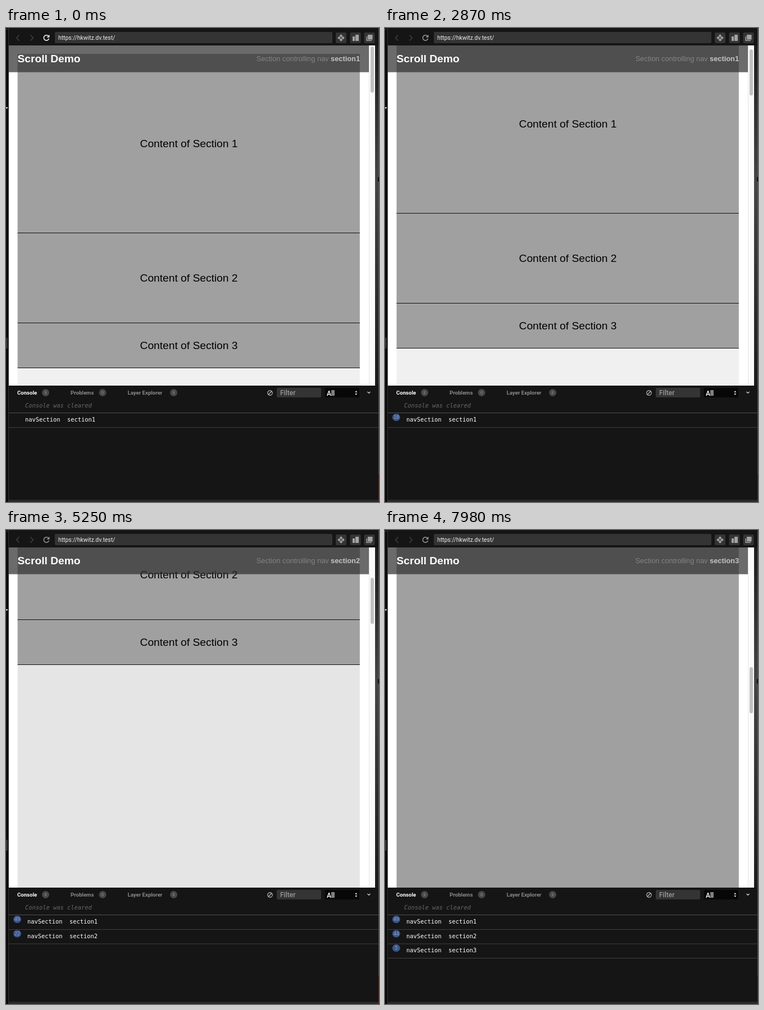
An HTML page that plays this animation: 664x843 px, repeating every 8 s.

```html
<!DOCTYPE html>
<html lang="en">
<head>
<meta charset="utf-8">
<title>Scroll Demo</title>
<style>
  html, body { margin: 0; width: 100%; height: 100%; overflow: hidden; background: #151515; }
  svg { display: block; width: 664px; height: 843px; }
  text { white-space: pre; }
  .ui { font-family: Roboto, "Open Sans", sans-serif; font-size: 10.4px; }
  .field { font-size: 12px; font-weight: 500; }
  .tab { font-size: 9.6px; font-weight: 700; }
  .page { font-family: "Liberation Sans", Arial, sans-serif; font-size: 19.2px; }
  .mono { font-family: "DejaVu Sans Mono", monospace; font-size: 10.4px; }
  .num { font-family: "DejaVu Sans Mono", monospace; font-size: 8.5px; text-anchor: middle; }
  .line { fill: none; stroke-width: 1.2; }
</style>
</head>
<body>
<svg viewBox="0 0 664 843" xmlns="http://www.w3.org/2000/svg">
  <defs>
    <clipPath id="view"><rect x="5" y="31" width="641" height="605"/></clipPath>
    <linearGradient id="edge" x1="0" y1="0" x2="0" y2="1">
      <stop offset="0" stop-color="#1c1c1c"/>
      <stop offset=".4" stop-color="#454545"/>
      <stop offset="1" stop-color="#1a1a1a"/>
    </linearGradient>
  </defs>

  <!-- window frame -->
  <rect width="664" height="843" fill="#151515"/>
  <rect width="4" height="843" fill="#0b0b0b"/>
  <rect x="4" width="1" height="843" fill="#333"/>
  <rect y="2" width="4" height="1" fill="#333"/>
  <rect y="141" width="3" height="2" fill="#ddd"/>
  <rect y="551" width="3" height="19" fill="#333"/>
  <rect x="657" y="31" width="6" height="605" fill="url(#edge)"/>
  <rect x="663" width="1" height="793" fill="#505050"/>
  <rect x="662" y="265" width="2" height="8" fill="#111"/>
  <rect x="663" y="793" width="1" height="50" fill="#54271f"/>
  <rect x="5" y="839" width="658" height="4" fill="#2a2a2a"/>

  <!-- toolbar -->
  <g class="line" stroke="#484848">
    <path d="M23.5 12.5 18.5 17.5 23.5 22.5"/>
    <path d="M43.5 12.5 48.5 17.5 43.5 22.5"/>
  </g>
  <g id="reload">
    <path class="line" stroke="currentColor" style="stroke-width:1.5" d="M75.6 14.4A4.7 4.7 0 1 0 76.5 18.8"/>
    <path fill="currentColor" d="M77.4 11.8V16.7H72.5Z"/>
  </g>
  <rect x="87" y="7" width="494" height="20" rx="2" fill="#343434"/>
  <text class="ui" x="93" y="21" fill="#f0f0f0">https://hkwitz.dv.test/</text>
  <g fill="#343434">
    <rect x="587" y="8" width="19" height="19" rx="2"/>
    <rect x="612.5" y="8" width="19" height="19" rx="2"/>
    <rect x="637.5" y="8" width="19" height="19" rx="2"/>
  </g>
  <g fill="#a2a2a2">
    <path d="M596.5 11.2l2.8 2.8-2.8 2.8-2.8-2.8zm0 7l2.8 2.8-2.8 2.8-2.8-2.8zm-3.5-3.5l2.8 2.8-2.8 2.8-2.8-2.8zm7 0l2.8 2.8-2.8 2.8-2.8-2.8z"/>
    <path d="M617 15h4v8h-4zM622 12h6v11h-6z"/>
    <path d="M641.5 15h1.5v6.5h8v1.5h-9.5zM644 12h8.5v8.5H644z"/>
  </g>

  <!-- browser page -->
  <rect x="5" y="31" width="652" height="605" fill="#fff"/>
  <g id="page">
    <g clip-path="url(#view)">
      <g id="content" class="page" text-anchor="middle">
        <rect id="tail" x="20.6" y="605" width="609.2" height="2400"/>
        <rect id="sections" x="20.6" y="46" width="609.2" height="559"/>
        <path d="M20.6 364.5H629.8M20.6 524.5H629.8M20.6 604.5H629.8" stroke="#000" stroke-opacity=".9"/>
        <text x="325.5" y="212">Content of Section 1</text>
        <text x="325.5" y="451">Content of Section 2</text>
        <text x="325.5" y="571">Content of Section 3</text>
      </g>
      <rect x="5" y="31" width="641" height="47.6" fill="#2d2d2d" fill-opacity=".7"/>
      <text class="page" x="20.5" y="61" font-weight="700" fill="#fff">Scroll Demo</text>
      <text class="page" x="630" y="59" text-anchor="end" style="font-size:12.8px" fill="#848484">Section controlling nav <tspan id="nav" font-weight="700" fill="#c4c4c4">section1</tspan></text>
    </g>
    <rect x="646" y="31" width="11" height="605" fill="#fafafa"/>
    <rect x="646" y="31" width="1" height="605" fill="#e6e6e6"/>
    <rect id="thumb" x="649" width="6" height="82" rx="3" fill="#c1c1c1"/>
  </g>

  <!-- console -->
  <g class="ui tab" fill="#8a8a8a">
    <text x="20" y="652" fill="#fff">Console</text>
    <text x="115" y="652">Problems</text>
    <text x="216.5" y="652">Layer Explorer</text>
  </g>
  <g id="badges"></g>
  <g class="line" stroke="#bbb"><circle cx="470" cy="649" r="4.2"/><path d="M467 652 473 646"/></g>
  <rect x="482" y="640" width="79" height="17" rx="2" fill="#343434"/>
  <text class="ui field" x="488" y="653" fill="#999">Filter</text>
  <rect x="568" y="640" width="61" height="17" rx="2" fill="#070707"/>
  <text class="ui field" x="571" y="653.5" fill="#fff">All</text>
  <path d="M621.3 648 623.3 645 625.3 648ZM621.3 650 623.3 653 625.3 650Z" fill="#ddd"/>
  <path class="line" stroke="#ddd" d="M643.5 647 646 649.5 648.5 647"/>
  <text class="mono" x="34" y="675" font-style="italic" fill="#686868">Console was cleared</text>
  <rect x="5" y="684" width="658" height="1" fill="#505050"/>
  <g id="rows"></g>
</svg>

<script>
const $ = id => document.getElementById(id);
const LOOP = 8000, STEP = 70, ROW = 25.5;
const CLEAR = 70, LOAD = 490, FADE = 250;

// wheel flicks: start, duration, distance
const flicks = [
  [2520, 770, 50], [3360, 840, 236], [4200, 210, 26], [4550, 350, 24],
  [5040, 420, 39], [5600, 280, 65], [6020, 210, 49], [6230, 140, 156],
  [6790, 350, 400], [7280, 350, 197], [7770, 210, 238]
];

// each section logs repeatedly while it controls the nav
const logs = [
  { from: 2520, to: 4130, total: 49 },
  { from: 4200, to: 6160, total: 44 },
  { from: 6090, to: 6340, total: 5 }
];

const clamp = p => Math.min(1, Math.max(0, p));
const sumFlicks = f => flicks.reduce((sum, [start, time, dist]) => sum + f(start, time, dist), 0);

// every flick slows down towards its end
const offset = t => sumFlicks((start, time, dist) => dist * (1 - (1 - clamp((t - start) / time)) ** 2));
const moving = t => sumFlicks((start, time) => time * clamp((t - start) / time));

// the log rate follows both scrolling time and distance
function countAt({ from, to, total }, t) {
  const part = f => clamp((f(t) - f(from)) / (f(to) - f(from)));
  return Math.round(1 + (total - 1) * (.6 * part(moving) + .4 * part(offset)));
}

// the CSS "ease" curve
function ease(p) {
  const bez = (u, a, b) => 3 * u * (1 - u) * (1 - u) * a + 3 * u * u * (1 - u) * b + u * u * u;
  let lo = 0, hi = 1;
  for (let i = 0; i < 20; i++) {
    const mid = (lo + hi) / 2;
    if (bez(mid, .25, .25) < clamp(p)) lo = mid; else hi = mid;
  }
  return bez(lo, .1, 1);
}

function grey(a, b, p) {
  const v = Math.round(a + (b - a) * p);
  return `rgb(${v},${v},${v})`;
}

const fade = (t, start) => grey(240, 160, ease((t - start) / FADE));
const show = (el, on) => el.setAttribute("visibility", on ? "visible" : "hidden");

$("badges").innerHTML = [70.5, 172, 298.5].map(x =>
  `<circle cx="${x}" cy="648.5" r="6.5" fill="#484848"/>
   <text class="ui" x="${x}" y="651" text-anchor="middle" style="font-size:7px" fill="#999">0</text>`).join("");

$("rows").innerHTML = logs.map((_, i) =>
  `<g transform="translate(0 ${i * ROW})">
    <g><rect x="13" y="686" width="14" height="13" rx="6.5" fill="#3b5688"/><text class="num" x="20" y="695.2" fill="#8ba0c8"></text></g>
    <text class="mono" y="700" fill="#fff">navSection  section${i + 1}</text>
    <rect x="5" y="710" width="658" height="1" fill="#404040"/>
  </g>`).join("");

logs.forEach((log, i) => {
  log.row = $("rows").children[i];
  [log.badge, log.label] = log.row.children;
  log.num = log.badge.lastElementChild;
});

function draw(time) {
  const t = Math.floor(time / STEP) * STEP;
  const y = Math.round(offset(t));
  const loaded = t < CLEAR || t >= LOAD;

  show($("page"), loaded);
  $("content").setAttribute("transform", `translate(0 ${-y})`);
  $("thumb").setAttribute("y", 33 + y * .1425);
  $("sections").setAttribute("fill", fade(t, t < CLEAR ? -FADE : LOAD + 4));
  $("tail").setAttribute("fill", fade(t, 5219));
  $("reload").style.color = grey(250, 150, ease((t - 560) / 150));

  let active = 1;
  logs.forEach((log, i) => {
    const on = i ? t > log.from : loaded;
    const n = countAt(log, t);
    const many = on && n > 1;
    if (on) active = i + 1;
    show(log.row, on);
    show(log.badge, many);
    log.num.textContent = n;
    log.label.setAttribute("x", many ? 38 : 34);
  });
  $("nav").textContent = "section" + active;
}

let start;
function tick(now) {
  start ??= now;
  draw(Math.max(0, now - start) % LOOP);
  requestAnimationFrame(tick);
}
draw(0);
requestAnimationFrame(tick);
</script>
</body>
</html>
```
